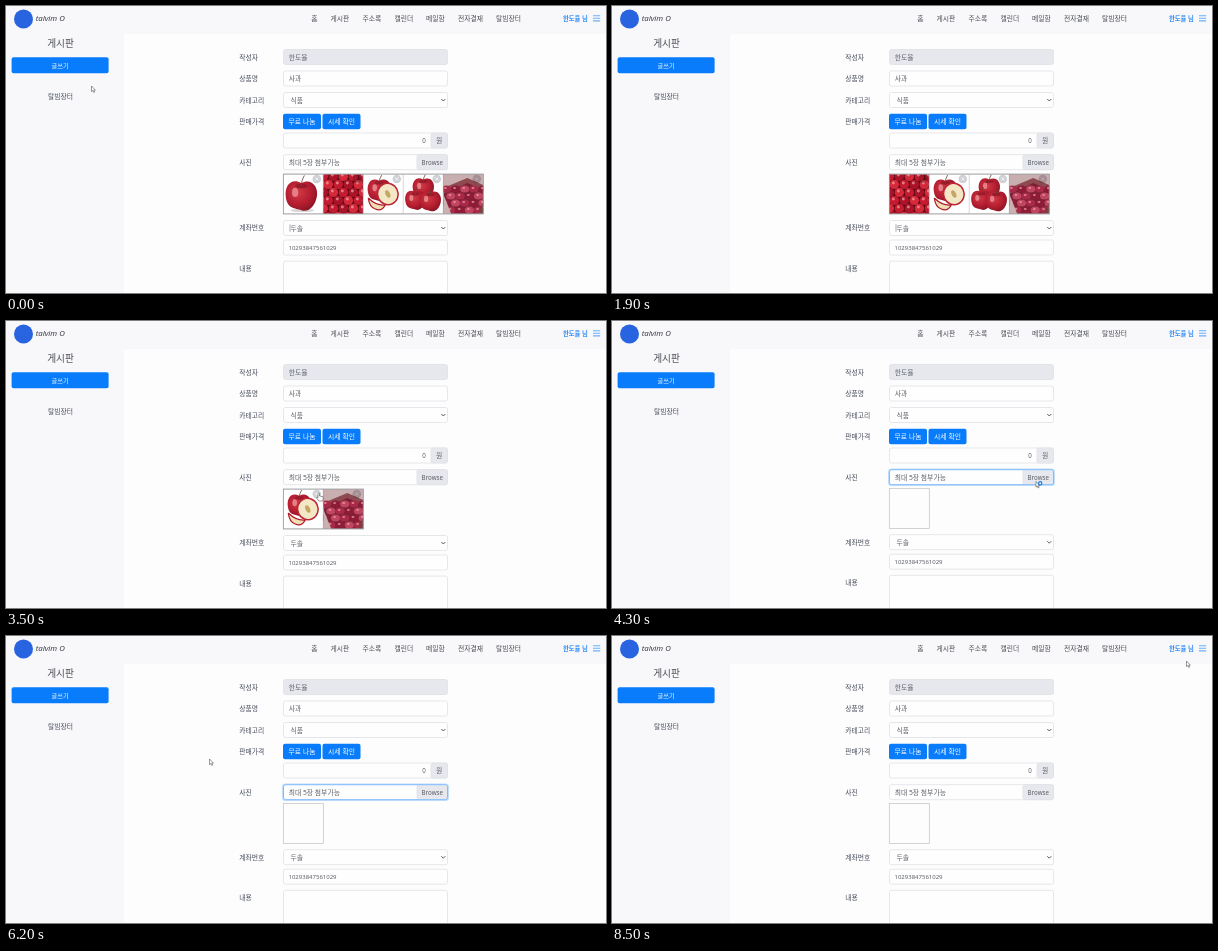
Write an HTML page that moves like this. It is 600 by 287 pixels and loops after 8600 ms.

```html
<!DOCTYPE html>
<html lang="ko">
<head>
<meta charset="utf-8">
<style>
  html, body { margin: 0; width: 100%; height: 100%; overflow: hidden; background: #fdfdfe; }
  #stage { display: block; width: 100vw; height: 100vh; }
  text { font-family: 'Noto Sans', 'Noto Sans CJK KR', 'Noto Sans CJK', sans-serif; font-size: 6.8px; fill: #5a5e66; }
  .nav { font-weight: 500; fill: #484b51; text-anchor: middle; }
  .label { fill: #454b58; }
  .mid { text-anchor: middle; }
  .white { fill: #fff; }
  .field { fill: #fefefe; stroke: #e0e1e5; stroke-width: .8; }
  .grey { fill: #e7e8ed; }
  .badge { mix-blend-mode: multiply; }
</style>
</head>
<body>
<svg id="stage" viewBox="0 0 600 287" preserveAspectRatio="none"></svg>
<script>
const LOOP = 8600;
const USER = '한도율', MARKET = '탈빔장터';
const stage = document.getElementById('stage');

const text = (x, y, s, cls = '', style = '') => `<text x="${x}" y="${y}" class="${cls}" style="${style}">${s}</text>`;
const box = (x, y, w, h, cls = 'field', extra = '') =>
  `<rect x="${x}" y="${y}" width="${w}" height="${h}" rx="2" class="${cls}" ${extra}/>`;
const field = (y, s, cls = 'field', x = 282.7) => box(277.5, y, 164, 15, cls) + text(x, y + 10.1, s);
const button = (x, y, w, h, s, size) =>
  box(x, y, w, h, '', 'fill="#087cfa"') + text(x + w / 2, y + h / 2 + 2.5, s, 'mid white', `font-size:${size}px`);
const label = (y, s) => text(233.3, y + 2.6, s, 'label');
const chevron = y => `<path d="M435.3 ${y}l2 2 2-2" fill="none" stroke="#565a60"/>`;
const circle = (x, y, r, fill, extra = '') => `<circle cx="${x}" cy="${y}" r="${r}" fill="${fill}" ${extra}/>`;

// Product pictures, each drawn in a 40 x 40 tile
const apple = (x, y, r, fill) =>
  `<path d="M${x} ${y - r * .8}C${x + r * .6} ${y - r * 1.15} ${x + r * 1.15} ${y - r * .6} ${x + r} ${y + r * .1}
  S${x + r * .4} ${y + r * 1.1} ${x} ${y + r * .95}S${x - r * .9} ${y + r * .9} ${x - r} ${y + r * .1}
  S${x - r * .6} ${y - r * 1.15} ${x} ${y - r * .8}" fill="${fill}"/>
  <ellipse cx="${x}" cy="${y - r * .62}" rx="${r * .4}" ry="${r * .16}" fill="#7c1423" opacity=".6"/>
  <ellipse cx="${x - r * .4}" cy="${y - r * .2}" rx="${r * .2}" ry="${r * .3}" fill="#f0a0a4" opacity=".7"/>
  <path d="M${x} ${y - r * .6}q0 ${-r * .4} ${r * .2} ${-r * .7}" fill="none" stroke="#65452f" stroke-width=".8"/>`;

function pile(cols, rows, r, colours) {
  let out = '';
  for (let j = 0; j <= rows; j++) for (let i = 0; i <= cols; i++) {
    const x = (i + (j % 2) * .5) * 40 / cols, y = (j + .3) * 40 / rows;
    out += circle(x, y, r, colours[(i * 2 + j) % colours.length]) +
      circle(x - r * .2, y - r * .3, r * .3, '#f0a0a0', 'opacity=".75"');
  }
  return out;
}

const fill = colour => `<rect width="40" height="40" fill="${colour}"/>`;
const half = (x, y, rx, ry, colour) =>
  `<ellipse cx="${x}" cy="${y}" rx="${rx}" ry="${ry}" transform="rotate(-25 ${x} ${y})" fill="${colour}"/>`;
const pictures = [
  fill('#fff') + '<ellipse cx="19" cy="36.5" rx="12" ry="1.6" fill="#d8d6d8"/>' + apple(18, 21.5, 15.5, 'url(#ripe)'),
  fill('#5c0a18') + pile(4, 5, 4.7, ['#c41b30', '#d62a3a', '#ab1328']),
  fill('#fff') + apple(16, 16, 11.5, 'url(#ripe)') +
    half(24.5, 20, 11, 11.5, '#bd2635') + half(24.5, 20, 9.5, 10, '#f3e7c6') + half(24.5, 20, 2.2, 4, '#c5a765') +
    '<path d="M5 24q8 8 17 7-4 7-10 4-6-2-7-11" fill="#efdfb4" stroke="#b31c2d" stroke-width="1.3"/>',
  fill('#fff') + apple(20, 14, 10.5, 'url(#ripe)') + apple(12, 26, 10, 'url(#ripe)') + apple(27, 27, 10.5, 'url(#ripe)'),
  fill('#7a2034') + '<path d="M0 0h40v13L24 6 0 17" fill="#c9aeb0"/>' +
    '<path d="M0 20V14L24 4 40 11V16L24 9Z" fill="#8d4a50"/>' +
    `<g transform="translate(3 13) scale(.92 .7)">${pile(4, 4, 5, ['#a82a48', '#c04560', '#8e1c38'])}</g>` +
    '<path d="M0 20l8 20H0" fill="#cbb0b2"/><path d="M40 28l-5 12h5" fill="#7a4140"/>'
];
const badge = `<g class="badge">${circle(33.5, 5, 4.3, '#cfd0d5')}
  <path d="M32 3.5l3 3m0-3l-3 3" stroke="#fff" stroke-width=".8"/></g>`;
const tile = (picture, slot) => `<svg x="${277.3 + slot * 40}" y="168" width="40" height="40">${pictures[picture]}${badge}` +
  '<rect x=".2" y=".2" width="39.6" height="39.6" fill="none" stroke="#b5b5b8" stroke-width=".5"/></svg>';

const navItems = [[308.5, '홈'], [334, '게시판'], [366, '주소록'], [398, '캘린더'],
  [429.5, '메일함'], [464.5, '전자결재'], [502.5, MARKET]];

stage.innerHTML = `
  <defs><radialGradient id="ripe" cx=".4" cy=".38" r=".68">
    <stop stop-color="#d13a45"/><stop offset=".6" stop-color="#b51d30"/><stop offset="1" stop-color="#861424"/>
  </radialGradient></defs>
  ${fill('none')}
  <rect width="600" height="287" fill="#f8f8fb"/>
  <path d="M118 287V30q0-2 2-2H600V287" fill="#fdfdfe"/>
  ${circle(17.5, 13, 9.5, '#2864e0')}
  ${text(29.7, 15.2, 'talvim O', '', 'font-size:7.8px;font-weight:500;font-style:italic;fill:#3a3e46')}
  ${navItems.map(([x, s]) => text(x, 14.6, s, 'nav')).join('')}
  ${text(557, 14.6, USER + ' 님', '', 'font-size:6.3px;font-weight:600;fill:#2b8af5')}
  <path d="M587 9.7h7.2m-7.2 2.6h7.2m-7.2 2.6h7.2" stroke="#6aaefa" stroke-width="1.1"/>
  ${text(54.5, 41, '게시판', 'mid', 'font-size:9.7px;fill:#484b51')}
  ${button(5.6, 51.2, 97, 16, '글쓰기', 6.2)}
  ${text(54.5, 92.7, MARKET, 'mid label')}
  ${label(51, '작성자')}${field(43.5, USER, 'field grey')}
  ${label(72.5, '상품명')}${field(65, '사과')}
  ${label(94, '카테고리')}${field(86.5, '식품', 'field', 284.5)}${chevron(93)}
  ${label(115.5, '판매가격')}
  ${button(277, 107.8, 38, 15.4, '무료 나눔', 6.8)}${button(316.5, 107.8, 38, 15.4, '시세 확인', 6.8)}
  ${box(277.5, 127, 164, 15)}${box(425, 127, 16.5, 15, 'field grey')}
  ${text(418, 136.9, '0', 'mid', 'font-size:6.2px')}${text(433.2, 137, '원', 'mid')}
  ${label(156, '사진')}
  <rect id="glow" x="277.5" y="149" width="164" height="14.5" rx="2" fill="none" stroke="#bfdeff" stroke-width="3"/>
  ${field(148.7, '최대 5장 첨부가능')}
  ${box(411, 148.7, 30.5, 15, 'field grey')}
  ${text(426.3, 158.5, 'Browse', 'mid', 'font-size:6.2px')}
  <rect id="focus" x="277.5" y="148.7" width="164" height="15" rx="2" fill="none" stroke="#80bdff"/>
  <g id="tiles"></g>
  <rect id="frame" x="277.3" fill="none" stroke-width=".7" height="40"/>
  <g id="below">
    ${label(221, '계좌번호')}${field(213.7, '두솔', 'field', 284.5)}${chevron(220.2)}
    <path id="caret" d="M284 217.5v7.5" stroke="#777" stroke-width=".6"/>
    ${box(277.5, 233.2, 164, 15)}${text(282.5, 242.9, '10293847561029', '', 'font-size:6px')}
    ${label(261.5, '내용')}${box(277.5, 254.3, 164, 60)}
  </g>
  <g id="pointer" stroke="#555" stroke-width=".6" fill="#fff" stroke-linejoin="round">
    <path id="arrow" d="M0 0V5.6L1.3 4.5 2.2 6.5 3.1 6.1 2.2 4.2H3.9Z"/>
    <path id="hand" d="M0 .5Q.8-.6 1.5.5V3L5 3.7Q5.6 6 4.6 8H.8L-1.6 4.8Q-1.2 3.8 0 5Z"/>
    <circle id="busy" cx="4.2" cy="1.8" r="1.7" fill="#d7edff" stroke="#1679d8" stroke-width="1.1"/>
  </g>`;

// [time, x, y] of the pointer tip
const path = [[0, 85.5, 80], [300, 85.5, 80], [1300, 312, 172], [2500, 312, 172], [2900, 351, 172],
  [3100, 351, 172], [3400, 312, 172], [3900, 312, 172], [4200, 424, 160.5], [4700, 424, 160.5],
  [5700, 203.5, 123], [6500, 203.5, 123], [7300, 326, 177], [7500, 312, 172], [7700, 312, 172],
  [8300, 574.5, 25], [LOOP, 574.5, 25]];
// [time, pictures shown from then on]
const uploads = [[0, [0, 1, 2, 3, 4]], [1800, [1, 2, 3, 4]], [2500, [2, 3, 4]], [3100, [2, 4]],
  [3700, [4]], [3900, []], [6500, [4]], [7700, []]];

const $ = id => document.getElementById(id);
const show = (id, on) => $(id).setAttribute('visibility', on ? 'visible' : 'hidden');
const within = (t, from, to) => t >= from && t < to;

function pointerAt(t) {
  const i = path.findIndex(p => p[0] > t);
  const [t0, x0, y0] = path[i - 1], [t1, x1, y1] = path[i];
  const u = (t - t0) / (t1 - t0), e = u * u * (3 - 2 * u);
  return [x0 + (x1 - x0) * e, y0 + (y1 - y0) * e];
}

let shown;
function showUploads(list) {
  if (list === shown) return;
  shown = list;
  $('tiles').innerHTML = list.map(tile).join('');
  $('frame').setAttribute('width', 40 * Math.max(1, list.length));
  $('frame').setAttribute('y', list.length ? 168 : 167.5);
  $('frame').setAttribute('stroke', list.length ? '#909093' : '#c0c1c5');
  $('below').setAttribute('transform', `translate(0 ${list.length ? .8 : 0})`);
}

function draw(now) {
  const t = Math.floor(now % LOOP / 100) * 100;
  showUploads(uploads.filter(([start]) => start <= t).pop()[1]);

  const focused = within(t, 4200, 6500);
  show('glow', focused);
  show('focus', focused);
  show('caret', t < 2800 || within(t, 6500, 7700));

  const [x, y] = pointerAt(t);
  const onBadge = Math.abs(y - 172) < 2 && x > 305 && x < 356;
  $('pointer').setAttribute('transform', `translate(${x} ${y})`);
  const visible = !within(t, 1800, 2100);
  show('arrow', visible && !onBadge);
  show('hand', visible && onBadge);
  show('busy', within(t, 4200, 4700));
  requestAnimationFrame(draw);
}
requestAnimationFrame(draw);
</script>
</body>
</html>
```
